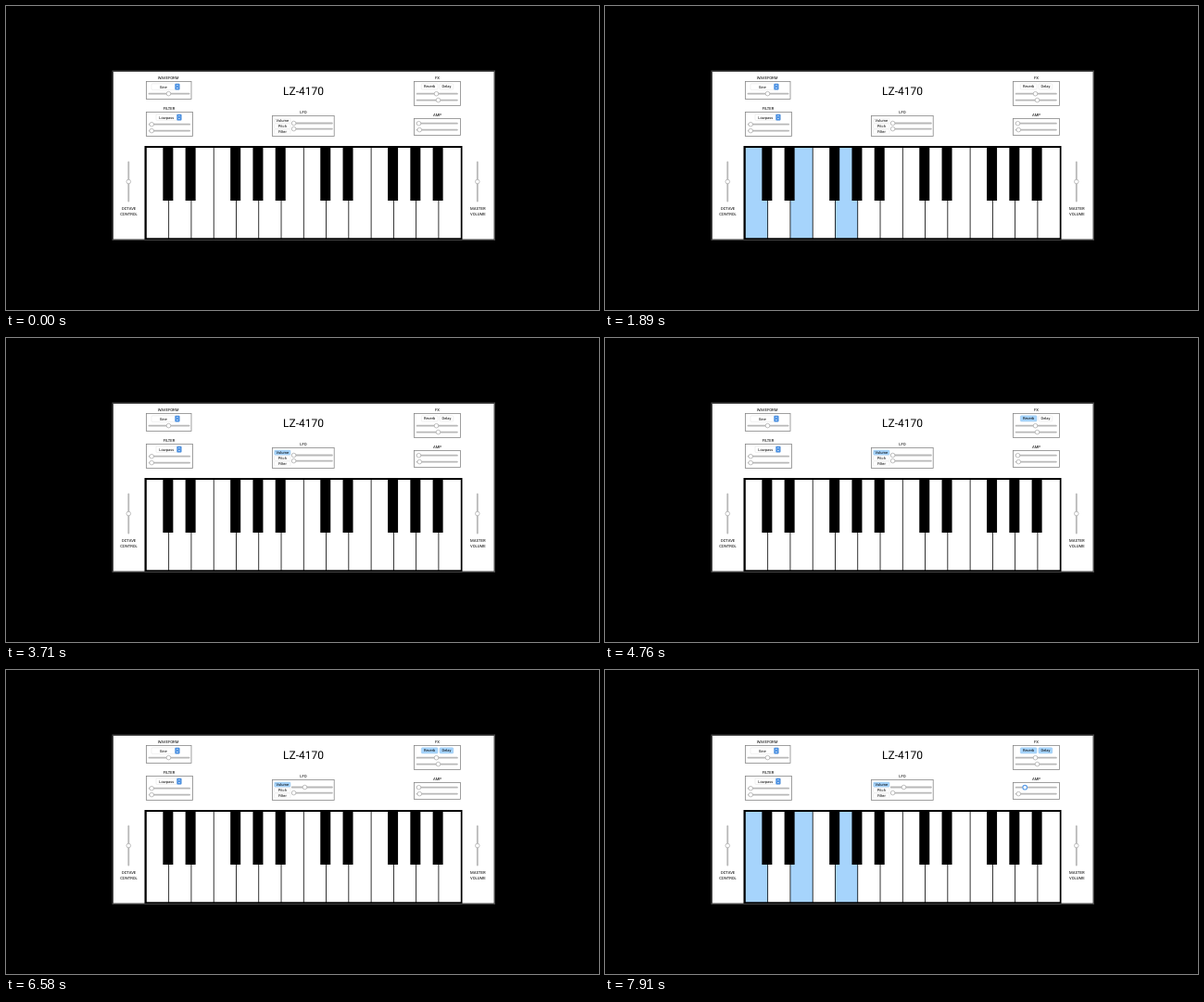
Write an HTML page with a canvas that moves like this. It is 640x328 px and loops after 8 s.

```html
<!DOCTYPE html>
<html lang="en">
<head>
<meta charset="utf-8">
<title>Synth</title>
<style>
html, body { margin: 0; width: 100%; height: 100%; overflow: hidden; background: #000; }
canvas { display: block; width: 640px; height: 328px; }
</style>
</head>
<body>
<canvas></canvas>
<script>
const LOOP = 8000, BLUE = '#a6d4fc';
const canvas = document.querySelector('canvas');
const ctx = canvas.getContext('2d');
const ratio = window.devicePixelRatio || 1;
canvas.width = 640 * ratio;
canvas.height = 328 * ratio;
ctx.scale(ratio, ratio);
ctx.textAlign = 'center';
ctx.textRendering = 'geometricPrecision';

function rect(x, y, w, h, fill) {
  ctx.fillStyle = fill;
  ctx.fillRect(x, y, w, h);
}

function rounded(x, y, w, h, fill, stroke) {
  ctx.beginPath();
  ctx.roundRect(x, y, w, h, 1);
  ctx.fillStyle = fill;
  ctx.fill();
  if (!stroke) return;
  ctx.lineWidth = 0.5;
  ctx.strokeStyle = stroke;
  ctx.stroke();
}

function text(str, x, y, size = 4.2, font = 'Roboto') {
  ctx.font = `${size}px ${font}, sans-serif`;
  ctx.fillStyle = '#000';
  ctx.fillText(str, x, y);
}

function frame(x, y, w, h) {
  ctx.lineWidth = 0.8;
  ctx.strokeStyle = '#888';
  ctx.strokeRect(x, y, w, h);
}

function thumb(x, y, focus) {
  ctx.beginPath();
  ctx.arc(x, y, 2.3, 0, 7);
  ctx.fillStyle = '#fff';
  ctx.fill();
  ctx.lineWidth = focus ? 1.1 : 0.6;
  ctx.strokeStyle = focus ? '#5b9de8' : '#999';
  ctx.stroke();
}

function slider(x, y, value, focus) {
  rounded(x, y - 0.9, 45, 1.8, '#b8b8b8');
  thumb(value, y, focus);
}

function fader(x) {
  rounded(x - 0.9, 167.5, 1.8, 44, '#b8b8b8');
  thumb(x, 189.5);
}

function select(label, x, y, w) {
  rounded(x, y, w, 6.6, '#fff', '#e2e2e2');
  rounded(x + w - 5.2, y, 5.2, 6.6, '#4a90e2');
  ctx.beginPath();
  for (const d of [-1, 1]) {
    const cx = x + w - 2.6, cy = y + 3.3 + d * 0.8;
    ctx.moveTo(cx - 0.9, cy);
    ctx.lineTo(cx, cy + d * 1.1);
    ctx.lineTo(cx + 0.9, cy);
  }
  ctx.lineWidth = 0.6;
  ctx.strokeStyle = '#fff';
  ctx.stroke();
  text(label, x + (w - 5) / 2, y + 4.8, 4, 'Liberation Sans');
}

function toggle(label, x, y, w, h, on) {
  rounded(x, y, w, h, on ? BLUE : '#fff', on ? '#9cc8ee' : '#e2e2e2');
  text(label, x + w / 2, y + h / 2 + 1.4, 4);
}

function keyboard(pressed) {
  const step = 24.27, left = 151.4;
  rect(149.5, 151, 343, 101, '#000');
  for (let i = 0; i < 14; i++) {
    const down = pressed && i < 5 && i % 2 === 0;
    rect(left + i * step + 0.4, 153, step - 0.8, 97.3, down ? BLUE : '#fff');
  }
  for (let i = 1; i < 14; i++) {
    if ([3, 7, 10].includes(i)) continue;
    if (i === 6) { rect(left + i * step - 6.3, 152, 11, 58, '#000'); continue; }
    if (blackAfter(i)) rect(left + i * step - 6.3, 152, 11, 58, '#000');
  }
}

const blackAfter = i => [1, 2, 4, 5, 6, 8, 9, 11, 12, 13].includes(i);

const between = (t, from, to) => t >= from && t < to;
const ease = (t, from, to) => {
  const p = Math.min(1, Math.max(0, (t - from) / (to - from)));
  return p * p * (3 - 2 * p);
};

function draw(t) {
  const lastChord = t >= 7840;
  rect(0, 0, 640, 328, '#000');
  rect(114.5, 69.5, 413.5, 183.5, '#444');
  rect(116, 71, 410.5, 180.5, '#fff');
  text('LZ-4170', 321, 95.7, 12);

  text('WAVEFORM', 175, 79.2);
  frame(151.5, 81.5, 48.5, 19);
  select('Sine', 157, 83.8, 30.5);
  slider(153.5, 94.6, 175.5);

  text('FILTER', 176, 112.3);
  frame(151.5, 114.5, 50, 26);
  select('Lowpass', 162, 116.8, 27.5);
  slider(154, 127.7, 157.2);
  slider(154, 134.6, 157.2);

  text('LFO', 321, 116.3);
  frame(287.5, 118.5, 66.7, 22);
  toggle('Volume', 289.7, 121, 17.3, 5.2, t >= 3290);
  toggle('Pitch', 289.7, 127, 17.3, 5.2);
  toggle('Filter', 289.7, 133, 17.3, 5.2);
  slider(307.8, 126.5, 310.6 + 11.9 * ease(t, 6020, 6580));
  slider(307.8, 132.6, 310.6);

  text('FX', 465.5, 79.2);
  frame(440.5, 81.5, 50, 26);
  toggle('Reverb', 448.3, 83.8, 17.7, 6.2, t >= 4340);
  toggle('Delay', 468, 83.8, 14.8, 6.2, t >= 4900);
  slider(442.8, 94.7, 464.5);
  slider(442.8, 101.6, 466.5);

  text('AMP', 465.5, 119.3);
  frame(440.5, 121.5, 50, 18);
  slider(442.8, 126.7, 445.5 + 7.7 * ease(t, 7140, 7630), lastChord);
  slider(442.8, 133.6, 446.3);

  fader(132.3);
  text('OCTAVE', 132.5, 219.7);
  text('CONTROL', 132.5, 226.1);
  fader(508.8);
  text('MASTER', 509.3, 219.7);
  text('VOLUME', 509.3, 226.1);

  keyboard(lastChord || between(t, 1750, 2520));
}

function tick() {
  draw(performance.now() % LOOP);
  requestAnimationFrame(tick);
}
tick();
</script>
</body>
</html>
```
